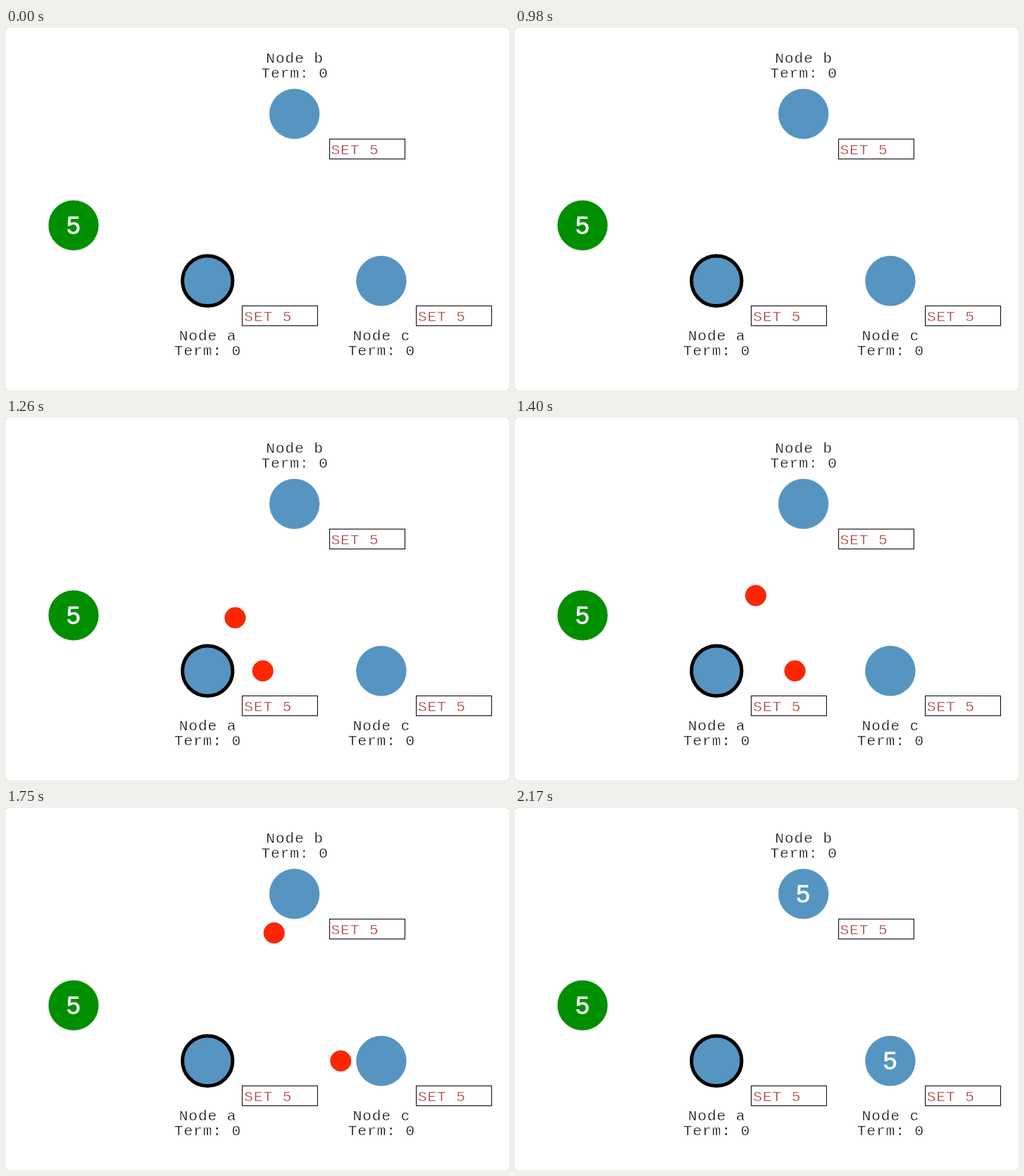
Animation, 708 px wide and 510 px high, one loop 2240 ms. Source, as an HTML page:

```html
<!DOCTYPE html>
<html lang="en">
<head>
<meta charset="utf-8">
<title>Leader replicates a value</title>
<style>
html, body { margin: 0; width: 100%; height: 100%; overflow: hidden; background: #fff; }
svg { display: block; width: 708px; height: 510px; }
text { text-anchor: middle; }
/* The white stroke thins the letters. */
.mono {
  font: 21px "Liberation Mono", "Courier New", monospace;
  letter-spacing: 0.9px; fill: #000; stroke: #fff; stroke-width: 0.5px;
}
.log { fill: #a83434; text-anchor: start; }
.value {
  font: 35px "Liberation Sans", Arial, sans-serif;
  fill: #fff; stroke: #fff; stroke-width: 0.8px;
}
</style>
</head>
<body>
<svg id="stage" viewBox="0 0 708 510">
  <rect width="708" height="510" fill="#777"/>
  <rect width="708" height="510" rx="2" fill="#fff"/>
</svg>
<script>
const stage = document.getElementById('stage');
const LOOP = 2240, STEP = 70, DEPART = 930, ARRIVE = 2030;

function add(tag, attrs, text = '') {
  const el = document.createElementNS('http://www.w3.org/2000/svg', tag);
  for (const key in attrs) el.setAttribute(key, attrs[key]);
  el.textContent = text;
  return stage.appendChild(el);
}

const disc = (x, y, r, fill, stroke, width = 0.7) =>
  add('circle', { cx: x, cy: y, r, fill, stroke, 'stroke-width': width });
const label = (x, y, text, cls) => add('text', { x, y, class: cls }, text);

const leader = { name: 'a', x: 283.7, y: 356.3, labelY: 440 };
const followers = [
  { name: 'b', x: 406, y: 121, labelY: 49 },
  { name: 'c', x: 528.3, y: 356.3, labelY: 440 }
];

// Messages come first so they slide out from behind the nodes.
for (const node of followers)
  node.message = disc(0, 0, 14.6, '#ff2600', '#d62410');

for (const node of [leader, ...followers]) {
  const { name, x, y, labelY } = node;
  if (node === leader) disc(x, y, 35.3, '#5695c2', '#000', 5);
  else disc(x, y, 35, '#5695c2', '#5088b0');
  label(x + 0.4, labelY, 'Node ' + name, 'mono');
  label(x + 0.4, labelY + 21, 'Term: 0', 'mono');
  add('rect', {
    x: Math.floor(x + 49.2) + 0.5, y: Math.floor(y + 35) + 0.5,
    width: 106, height: 28, fill: '#fff', stroke: '#111', 'stroke-width': 1.1
  });
  label(x + 51.5, y + 56.8, 'SET 5', 'mono log');
}

disc(95.1, 278, 35, '#008f00', '#0a860a');
label(95, 289.6, '5', 'value');
for (const node of followers)
  node.value = label(node.x - 0.4, node.y + 11.7, '5', 'value');

// Steady travel that slows a little in the second half.
function progress(t) {
  const late = Math.max(0, t - 1470);
  return 0.451 + 0.00095 * (t - 1400) - 2.2e-7 * late * late;
}

const start = performance.now();
function draw(now) {
  const t = Math.floor((Math.max(0, now - start) % LOOP) / STEP) * STEP;
  const p = progress(t);
  const moving = t >= DEPART && t < ARRIVE;
  for (const { x, y, message, value } of followers) {
    message.setAttribute('cx', leader.x + (x - leader.x) * p);
    message.setAttribute('cy', leader.y + (y - leader.y) * p);
    message.style.display = moving ? '' : 'none';
    value.style.display = t >= ARRIVE ? '' : 'none';
  }
  requestAnimationFrame(draw);
}
draw(start);
</script>
</body>
</html>
```
